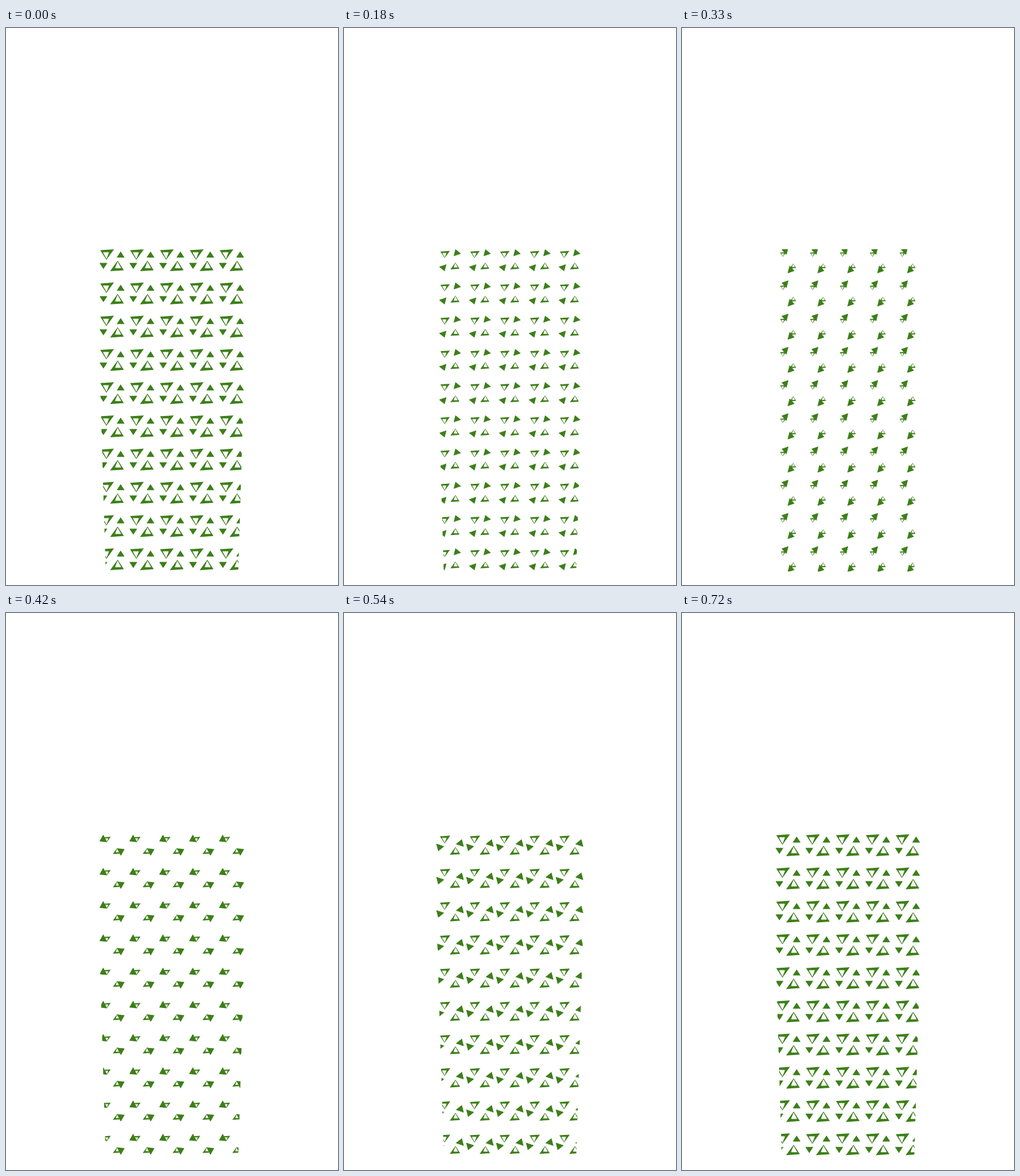
Write an HTML page with a canvas that moves like this. It is 578 px wide and 969 px high and loops after 750 ms.

```html
<!DOCTYPE html>
<html lang="en">
<head>
<meta charset="utf-8">
<title>Turning triangles</title>
<style>
  html, body { margin: 0; width: 100%; height: 100%; overflow: hidden; background: #fff; }
  canvas { display: block; }
</style>
</head>
<body>
<canvas id="stage" width="578" height="969"></canvas>
<script>
const ctx = document.getElementById('stage').getContext('2d');
const STEP = 30, STEPS = 25;
const COLS = 5, ROWS = 10, DX = 52, DY = 57.8;
const ORIGIN = { x: 184.6, y: 404 };
const GREEN = '#3c7f18';

// Zigzag points between two ends of a horizontal edge
function teeth(x0, x1, y, count, depth) {
  const pts = [];
  for (let i = 0; i <= count * 2; i++) {
    pts.push([x0 + (x1 - x0) * i / (count * 2), y + (i % 2 ? depth : 0)]);
  }
  return pts;
}

function polygon(...rings) {
  const path = new Path2D();
  for (const ring of rings) {
    ring.forEach(([x, y], i) => i ? path.lineTo(x, y) : path.moveTo(x, y));
    path.closePath();
  }
  return path;
}

const solid = polygon([[0, -7.2], ...teeth(7.2, -7.2, 3.8, 5, -0.9)]);
const hollow = polygon(
  [[-12.2, -7.4], [11.8, -9], [-1.4, 9.2]],
  [[-1.2, 7.5], ...teeth(-7.9, 3.5, -4.4, 4, 1.2)]
);

// Tapered window the pattern is seen through
const edge = y => 116 + (924 - y) * 0.0302;
const TOP = 384.7, BOTTOM = 945.4, MID = 289;
const windowPath = polygon([
  [MID - edge(TOP), TOP], [MID + edge(TOP), TOP],
  [MID + edge(BOTTOM), BOTTOM], [MID - edge(BOTTOM), BOTTOM]
]);

const lerp = (a, b, p) => a + (b - a) * p;
const peak = (k, start, at, end) =>
  k < at ? Math.max(0, (k - start) / (at - start)) : (end - k) / (end - at);
const sine = p => (1 - Math.cos(Math.PI * p)) / 2;
const smooth = p => p * p * p * (p * (6 * p - 15) + 10);

function shape(path, x, y, scale) {
  ctx.save();
  ctx.translate(x, y);
  ctx.scale(scale, scale);
  ctx.fill(path, 'evenodd');
  ctx.restore();
}

function halfTile(x, y, angle, hollowScale, pose) {
  ctx.save();
  ctx.translate(x, y);
  ctx.rotate(angle);
  shape(hollow, -8.4, -10, hollowScale);
  ctx.rotate(-pose.turn);
  shape(solid, 15 * pose.solid, -8 * pose.solid, pose.solid);
  ctx.restore();
}

function draw(now) {
  const k = Math.floor(now / STEP) % STEPS;
  const pose = {
    upper: lerp(1, 0.45, sine(peak(k, 0, 11, 24))),
    lower: lerp(1, 0.43, peak(k, 0, 10, 24)),
    solid: lerp(1, 1.11, peak(k, 10, 16, 24)),
    turn: Math.PI * smooth(k / 24)
  };
  ctx.clearRect(0, 0, 578, 969);
  ctx.save();
  ctx.clip(windowPath);
  ctx.fillStyle = GREEN;
  for (let r = 0; r < ROWS; r++) {
    for (let c = 0; c < COLS; c++) {
      const x = ORIGIN.x + c * DX, y = ORIGIN.y + r * DY;
      halfTile(x, y, 0, pose.upper, pose);
      halfTile(x, y, Math.PI, pose.lower, pose);
    }
  }
  ctx.restore();
}

const start = performance.now();
function loop() {
  draw(performance.now() - start);
  requestAnimationFrame(loop);
}
loop();
</script>
</body>
</html>
```
